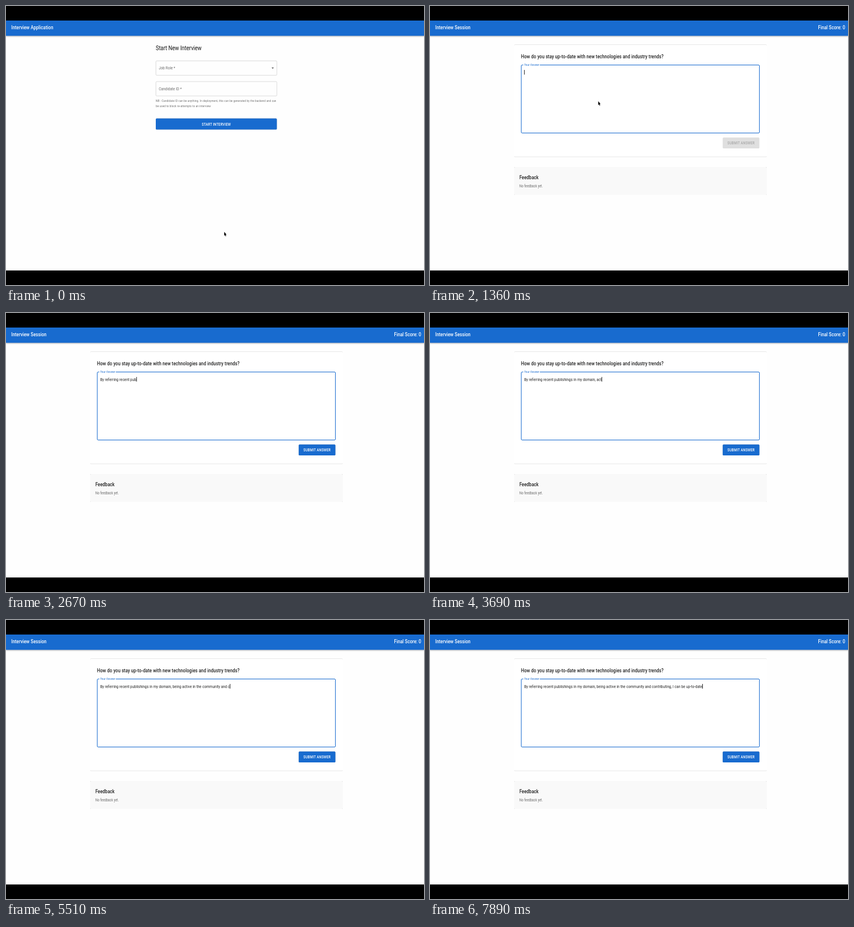
Recreate the animation shown at these times as an HTML page. Size 720 by 480 pixels, loop 7990 ms.

```html
<!DOCTYPE html>
<html lang="en">
<head>
<meta charset="utf-8">
<title>Interview</title>
<style>
  html, body { margin: 0; width: 100%; height: 100%; overflow: hidden; background: #000; }
  svg { display: block; width: 720px; height: 480px; font-family: Roboto, sans-serif; }
  text { white-space: pre; }
  .bar { filter: drop-shadow(0 1px 1px rgba(0, 0, 0, .3)); }
  .card { filter: drop-shadow(0 .8px .7px rgba(0, 0, 0, .34)); }
  .btn { filter: drop-shadow(0 .7px .6px rgba(0, 0, 0, .32)); }
</style>
</head>
<body>
<svg id="stage" viewBox="0 0 720 480"></svg>
<script>
const LOOP = 7990;
const SX = 0.379, SY = 0.45;   // page pixels to stage pixels
const BLUE = '#186bcf', INK = '#212121', GREY = '#6b6b6b';
const SESSION_AT = 900, TYPING_AT = 1400;

const stage = document.getElementById('stage');

function add(parent, tag, attrs, content) {
  const el = document.createElementNS('http://www.w3.org/2000/svg', tag);
  for (const key in attrs) el.setAttribute(key, attrs[key]);
  if (content) el.textContent = content;
  return parent.appendChild(el);
}

function rect(parent, x, y, width, height, attrs) {
  return add(parent, 'rect', { x, y, width, height, ...attrs });
}

// Text is set at page size and scaled with the page.
function label(parent, x, y, size, content, attrs) {
  return add(parent, 'text', {
    transform: `translate(${x} ${y}) scale(${SX} ${SY})`,
    'font-size': size, fill: INK, ...attrs
  }, content);
}

const heading = { 'font-weight': 500, 'letter-spacing': '.0075em' };
const body = { 'letter-spacing': '.00938em' };
const button = { 'font-weight': 500, 'letter-spacing': '.02857em', 'text-anchor': 'middle', fill: '#fff' };

rect(stage, 0, 25, 720, 430, { fill: '#fefefe' });
rect(stage, 0, 25, 720, 26.3, { fill: BLUE, class: 'bar' });
rect(stage, 0, 0, 720, 25, {});
rect(stage, 0, 455, 720, 25, {});
const title = label(stage, 9, 40.4, 20, 'Interview Application', { ...heading, fill: '#fff' });

// Start page
const start = add(stage, 'g', {});
label(start, 258, 76.4, 24, 'Start New Interview', { fill: '#111' });
[[94.4, 'Job Role *'], [130, 'Candidate ID *']].forEach(([y, name]) => {
  rect(start, 258.2, y, 208.4, 24.8, { rx: 1.6, fill: 'none', stroke: '#c4c4c4', 'stroke-width': 0.6 });
  label(start, 263.2, y + 14.9, 16, name, { ...body, fill: GREY });
});
add(start, 'path', { d: 'M457.4 105.8h4l-2 2.3z', fill: '#555' });
[
  'NB : Candidate ID can be anything. In deployment, this can be generated by the backend and can',
  'be used to block re-attempts to an interview'
].forEach((line, i) => label(start, 258, 164.6 + i * 8.9, 12, line, { 'letter-spacing': '.03333em', fill: GREY }));
rect(start, 258, 193.6, 208.5, 18.9, { rx: 1.5, fill: BLUE, class: 'btn' });
label(start, 362.2, 205.5, 15, 'START INTERVIEW', button);

// Session page
const session = add(stage, 'g', {});
label(session, 715.2, 40.4, 20, 'Final Score: 0', { ...heading, 'text-anchor': 'end', fill: '#fff' });
rect(session, 145, 66.5, 435, 193, { rx: 1.5, fill: '#fff', class: 'card' });
label(session, 156.8, 90.3, 20, 'How do you stay up-to-date with new technologies and industry trends?', heading);
rect(session, 157.2, 101.5, 410.2, 117, { rx: 1.5, fill: '#fff', stroke: BLUE, 'stroke-width': 1 });
rect(session, 160.6, 100.4, 28.6, 2.2, { fill: '#fff' });
label(session, 162.2, 103.1, 12, 'Your Answer', { ...body, fill: BLUE });
const answer = label(session, 162.2, 116.6, 16, '', body);
const caret = rect(session, 0, 110, 0.9, 8, { fill: '#111' });
const submit = rect(session, 504.2, 226.2, 63.2, 18.7, { rx: 1.5 });
const submitText = label(session, 535.8, 238.1, 15, 'SUBMIT ANSWER', button);
rect(session, 145, 277, 435, 48, { rx: 1.5, fill: '#f9f9f9', class: 'card' });
label(session, 153.9, 298.3, 20, 'Feedback', heading);
label(session, 153.9, 312.3, 14, 'No feedback yet.', { 'letter-spacing': '.01071em', fill: GREY });

const pointer = add(stage, 'path', {
  d: 'M0 0v6.6l1.3-1.2 1 2.2 1-.5-1-2.1h1.7z',
  fill: '#000', stroke: '#fff', 'stroke-width': 0.5, 'paint-order': 'stroke'
});

const route = [
  [100, 375.9, 388.6], [360, 420, 107], [560, 330, 142], [800, 362, 204], [900, 362, 204], [1240, 289.8, 163.8]
];

const opening = 'By referring recent pub';
const domain = opening + 'lishings in my domain, ';
const active = domain + 'being active in the commu';
const contributing = active + 'nity and contributing,';
const edits = [
  [TYPING_AT, ''], [2660, opening], [2700, opening], [3680, domain + 'act'], [3700, domain + 'act'],
  [3840, domain], [4520, active], [4550, active], [6480, contributing], [6530, contributing],
  [7880, contributing + ' I can be up-to-date']
];

// Neighbouring keys around t, and the progress between them.
function between(keys, t) {
  const next = keys.findIndex(key => key[0] > t);
  if (next === 0) return [keys[0], keys[0], 0];
  if (next < 0) return [keys.at(-1), keys.at(-1), 0];
  const a = keys[next - 1], b = keys[next];
  return [a, b, (t - a[0]) / (b[0] - a[0])];
}

function typed(t) {
  const [[, a], [, b], p] = between(edits, t);
  const count = Math.floor(a.length + (b.length - a.length) * p);
  return (a.length > b.length ? a : b).slice(0, count);
}

function show(el, on) {
  el.setAttribute('display', on ? 'inline' : 'none');
}

function draw(t) {
  const inSession = t >= SESSION_AT;
  show(start, !inSession);
  show(session, inSession);
  title.textContent = inSession ? 'Interview Session' : 'Interview Application';

  const [a, b, p] = between(route, t);
  const ease = p * p * (3 - 2 * p);
  const at = i => a[i] + (b[i] - a[i]) * ease;
  pointer.setAttribute('transform', `translate(${at(1)} ${at(2)})`);
  show(pointer, t < TYPING_AT);

  const value = typed(t);
  answer.textContent = value;
  const width = inSession && value ? answer.getComputedTextLength() : 0;
  caret.setAttribute('x', 162.2 + width * SX);
  submit.setAttribute('fill', value ? BLUE : '#dfdfdf');
  submit.setAttribute('class', value ? 'btn' : '');
  submitText.setAttribute('fill', value ? '#fff' : '#a8a8a8');
}

const begin = performance.now();
function tick() {
  draw((performance.now() - begin) % LOOP);
  requestAnimationFrame(tick);
}
tick();
</script>
</body>
</html>
```
